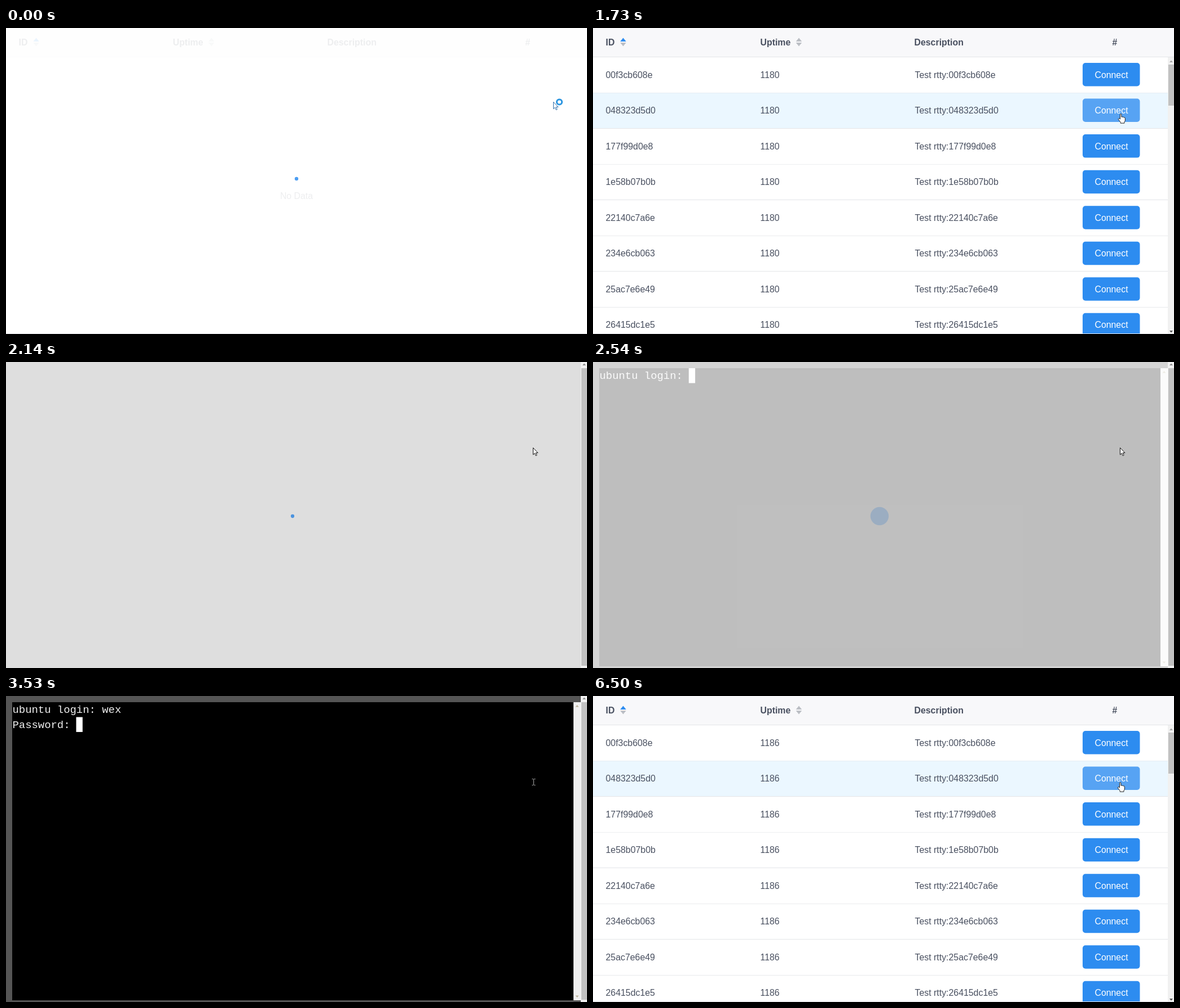
An HTML page that plays this animation: 1030 px wide and 544 px high, repeating every 6.94 s.

```html
<!DOCTYPE html>
<html lang="en">
<head>
<meta charset="utf-8">
<title>Device list and web terminal</title>
<style>
  html, body { margin: 0; width: 100%; height: 100%; overflow: hidden; background: #fff; }
  svg { display: block; }
  text { white-space: pre; }
  .table text { font: 15.88px "Liberation Sans", Arial, sans-serif; fill: #495060; }
  .table .head { font-weight: bold; }
  .table .label { fill: #fff; text-anchor: middle; }
  .term text { font: 18.9px "Liberation Mono", "Courier New", monospace; fill: #f0f0f0; }
  .crisp { shape-rendering: crispEdges; }
</style>
</head>
<body>
<svg id="stage" width="1030" height="544" viewBox="0 0 1030 544"></svg>
<script>
const LOOP = 6940;
const BLUE = '#2d8cf0';
const ROW = 63.55;
const COL = 11.342, LINE = 26.5, LEFT = 11.5, TOP = 11.5;
const USER = 'wex';
const ids = ['00f3cb608e', '048323d5d0', '177f99d0e8', '1e58b07b0b',
  '22140c7a6e', '234e6cb063', '25ac7e6e49', '26415dc1e5'];

const rect = (x, y, w, h, fill, extra = 'class="crisp"') =>
  `<rect x="${x}" y="${y}" width="${w}" height="${h}" fill="${fill}" ${extra}/>`;
const label = (x, y, text, extra = '') => `<text x="${x}" y="${y}" ${extra}>${text}</text>`;
const triangle = (x, y, w, h, fill) =>
  `<path d="M${x - w / 2} ${y}h${w}L${x} ${y + h}z" fill="${fill}"/>`;
const sorter = (x, upFill) =>
  triangle(x, 24, 10.5, -6.5, upFill) + triangle(x, 26, 10.5, 6.5, '#bbbec4');

function tableRow(id, i) {
  const y = ROW * i, base = Math.round(88.6 + y);
  return rect(0, 52 + y, 1019, ROW, '#fff', i === 1 ? 'id="hoverRow"' : '') +
    rect(0, Math.round(114.6 + y), 1019, 1, '#e3e5e8') +
    label(22.5, base, id) +
    label(296.5, base, '', 'class="uptime"') +
    label(570.5, base, 'Test rtty:' + id) +
    rect(868, 62 + y, 101.5, 41.5, BLUE, `rx="5" ${i === 1 ? 'id="hoverButton"' : ''}`) +
    label(919, base, 'Connect', 'class="label"');
}

const table = `
  <g id="table" class="table">
    ${rect(0, 0, 1030, 544, '#fff')}
    <g id="rows">
      ${ids.map(tableRow).join('')}
      ${rect(1019, 52, 11, 492, '#f1f1f1')}
      ${rect(1020, 65, 10, 73, '#c1c1c1')}
      ${triangle(1025, 61, 6, -3.5, '#a3a3a3')}
      ${triangle(1025, 538, 6, 3.5, '#505050')}
    </g>
    ${label(515, 304, 'No Data', 'id="noData" text-anchor="middle"')}
    ${rect(0, 0, 1030, 51, '#f8f8fa')}
    ${rect(0, 51, 1030, 1, '#e3e5e8')}
    ${label(22.5, 31, 'ID', 'class="head"')}
    ${sorter(53.5, BLUE)}
    <g id="uptimeHead">${label(296.5, 31, 'Uptime', 'class="head"')}${sorter(365, '#bbbec4')}</g>
    ${label(569.5, 31, 'Description', 'class="head"')}
    ${label(925, 31, '#', 'class="head" text-anchor="middle"')}
  </g>`;

const terminal = `
  <g id="page" class="term">
    ${rect(0, 0, 1030, 544, '#555')}
    <g id="terminal">
      ${rect(11, 11, 995, 530, '#000')}
      ${rect(1006, 11, 13, 530, '#f0f0f0')}
      ${triangle(1012.5, 19.5, 6, -3.5, '#b9b29a')}
      ${triangle(1012.5, 532.5, 6, 3.5, '#b9b29a')}
      ${rect(0, 0, COL, 26.5, '#fff', 'id="caret"')}
      ${Array.from({ length: 10 }, (_, i) => label(LEFT, 30 + LINE * i, '', 'class="line"')).join('')}
    </g>
  </g>`;

const pageBar = `
  <g id="pageBar">
    ${rect(1019, 0, 11, 544, '#f1f1f1')}
    ${rect(1020, 11, 10, 529, '#c1c1c1')}
    ${triangle(1025, 6, 6, -3.5, '#8a8a8a')}
  </g>`;

const pointers = `
  <g id="pointer">
    <path id="arrow" d="M.5 .5V12.8L3.3 10.2L5.2 14.6L7.2 13.7L5.3 9.5H9z" fill="#fff"/>
    <circle id="busy" cx="11" cy=".5" r="4.6" fill="#fff" stroke="#2d96e0" stroke-width="3"/>
    <path id="beam" d="M-2.5-5.5H-.8L.5-4.8L1.8-5.5H3.5M.5-4.8V4.8M-2.5 5.5H-.8L.5 4.8L1.8 5.5H3.5"
      fill="none" stroke="#aaa"/>
    <path id="hand" d="M-1.5 10V2Q-1.5 .6-.3 .6T.9 2V6.2Q2.2 5.2 3.2 6.5Q4.6 5.8 5.4 7Q7.4 6.6 7.4 8.5
      V12Q7.4 14 6 15V17.2H-.8V15.4L-4.4 10.8Q-5.2 9.4-4 8.8T-1.5 10z" fill="#fff" stroke="#222"/>
  </g>`;

document.getElementById('stage').innerHTML = table + terminal + `
  <g id="spin">
    ${rect(0, 0, 1030, 544, '#fff', 'id="veil" fill-opacity=".9"')}
    <circle id="dot" fill="${BLUE}"/>
  </g>
  ${rect(0, 543, 1030, 1, '#dddee1', 'id="footLine"')}` + pageBar + pointers;

const el = Object.fromEntries([...document.querySelectorAll('[id]')].map(n => [n.id, n]));
const uptimes = document.querySelectorAll('.uptime');
const lines = document.querySelectorAll('.line');

const set = (node, attrs) => { for (const k in attrs) node.setAttribute(k, attrs[k]); };
const show = (node, on) => node.setAttribute('display', on ? 'inline' : 'none');
const ramp = (t, from, to) => Math.min(1, Math.max(0, (t - from) / (to - from)));
const mix = (a, b, k) => `rgb(${a.map((v, i) => Math.round(v + (b[i] - v) * k))})`;

// CSS ease-in-out: cubic-bezier(.42, 0, .58, 1)
function easeInOut(x) {
  let lo = 0, hi = 1;
  for (let i = 0; i < 20; i++) {
    const s = (lo + hi) / 2, r = 1 - s;
    if (3 * r * r * s * .42 + 3 * r * s * s * .58 + s ** 3 < x) lo = s; else hi = s;
  }
  return lo * lo * (3 - 2 * lo);
}

const login = 'ubuntu login: ';
const prompt = USER + '@ubuntu:~$ ';
const greeting = [
  'Last login: Wed Jan 24 13:28:35 CST 2018 on pts/4',
  'Welcome to Ubuntu 16.04.3 LTS (GNU/Linux 4.4.0-109-generic x86_64)',
  '',
  ' * Documentation:  https://help.ubuntu.com',
  ' * Management:     https://landscape.canonical.com',
  ' * Support:        https://ubuntu.com/advantage'
];
const typed = (word, times, t) => word.slice(0, times.filter(at => t >= at).length);

function screenLines(t) {
  const out = [login + typed(USER, [2920, 3070, 3230], t)];
  if (t >= 3530) out.push('Password: ');
  if (t >= 4390) out.push(...greeting);
  if (t >= 4460) out.push('You have mail.', prompt + typed('exit', [5320, 5400, 5550, 5700], t));
  else if (t >= 4310) out.push('');
  return out;
}

function drawTerminal(t) {
  show(el.terminal, t >= 2490);
  const out = screenLines(t);
  lines.forEach((node, i) => { node.textContent = out[i] || ''; });
  const row = out.length - 1;
  set(el.caret, { x: LEFT - 1 + out[row].length * COL + .5, y: TOP + row * LINE - .5 });
  show(el.caret, !(t >= 3850 && t < 4080) && !(t >= 5090 && t < 5320));
}

function drawTable(t) {
  const loaded = t >= 6260 || (t >= 905 && t < 1873);
  show(el.rows, loaded);
  show(el.noData, !loaded);
  set(el.uptimeHead, { transform: `translate(${loaded ? 0 : -.8} 0)` });
  uptimes.forEach(n => { n.textContent = t < 4000 ? '1180' : '1186'; });
  const late = t > 4000;
  const rowHover = late ? ramp(t, 6300, 6480) : ramp(t, 1300, 1500);
  const buttonHover = late ? ramp(t, 6300, 6480) : ramp(t, 1550, 1730);
  set(el.hoverRow, { fill: mix([255, 255, 255], [235, 247, 255], rowHover) });
  set(el.hoverButton, { fill: mix([45, 140, 240], [87, 163, 243], buttonHover) });
}

function drawSpin(t, inTerminal) {
  let alpha, start;
  if (inTerminal) {
    alpha = Math.min(ramp(t, 1873, 2173), 1 - ramp(t, 2490, 2790));
    start = 1873;
  } else if (t < 1873) {
    alpha = 1 - ramp(t, 905, 1205);
    start = -270;
  } else {
    alpha = .3 * Math.min(ramp(t, 6160, 6250), 1 - ramp(t, 6260, 6400));
    start = 6180;
  }
  const grow = easeInOut((t - start) % 1000 / 1000);
  set(el.spin, { opacity: alpha });
  set(el.veil, { width: inTerminal ? 1019 : 1030 });
  set(el.dot, {
    cx: inTerminal ? 508 : 515, cy: inTerminal ? 274 : 268,
    r: 21 * grow, 'fill-opacity': 1 - grow
  });
}

function drawPointer(t) {
  const go = easeInOut(ramp(t, 1500, 1700)), settle = ramp(t, 2000, 2140);
  const x = 970 - 35 * go - settle, y = 131 + 20 * go + settle;
  const hand = (t >= 1580 && t < 1873) || t >= 6340;
  const beam = t >= 2780 && t < 6180;
  show(el.hand, hand);
  show(el.beam, beam);
  show(el.arrow, !hand && !beam);
  show(el.busy, t < 550);
  set(el.arrow, { stroke: t < 1500 ? '#2f6da8' : '#111' });
  set(el.pointer, { transform: `translate(${beam || hand ? x + 1 : x} ${beam || hand ? y + 1 : y})` });
}

function draw(t) {
  const inTerminal = t >= 1873 && t < 6180;
  show(el.table, !inTerminal);
  show(el.footLine, !inTerminal);
  show(el.page, inTerminal);
  show(el.pageBar, inTerminal);
  if (inTerminal) drawTerminal(t); else drawTable(t);
  drawSpin(t, inTerminal);
  drawPointer(t);
}

const began = performance.now();
function tick() {
  draw((performance.now() - began) % LOOP);
  requestAnimationFrame(tick);
}
tick();
</script>
</body>
</html>
```
